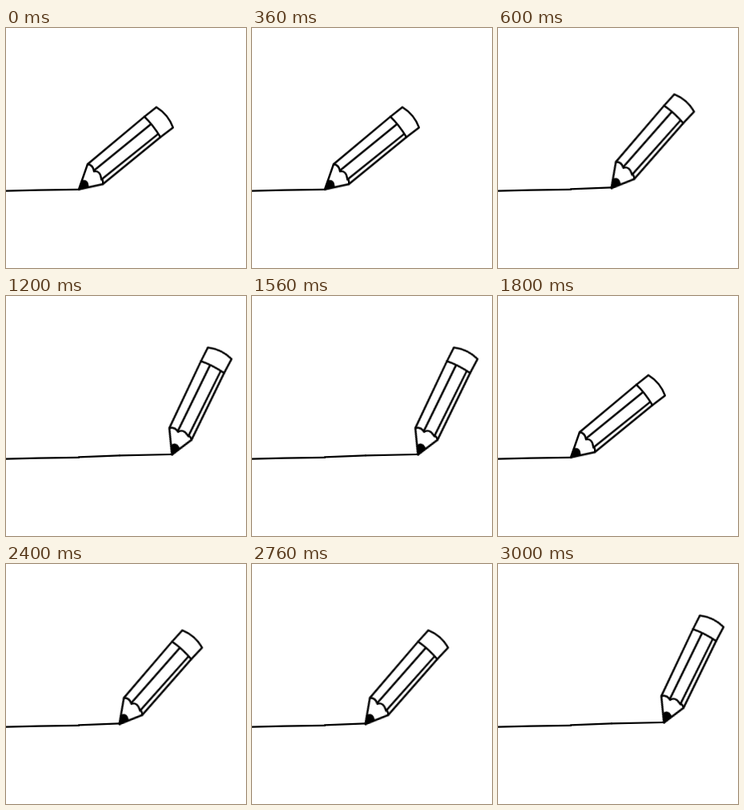
These frames come from a looping animation (300 px wide and 300 px high, 3.4 s). An HTML page without scripts:

```html
<!DOCTYPE html>
<html lang="en">
<head>
<meta charset="utf-8">
<title>Pencil drawing a line</title>
<style>
  html, body { margin: 0; width: 100%; height: 100%; overflow: hidden; background: #fff; }
  svg { display: block; width: 100%; height: 100%; }
  path { fill: none; stroke: #000; stroke-width: 2.2; stroke-linecap: round; stroke-linejoin: round; }
  .pencil path { stroke-width: 2.4; }
  .pencil .lead { fill: #000; stroke-width: 1.4; }
  .pencil, .middle, .end { animation: 3400ms step-end infinite; }
  .pencil { animation-name: pose; }
  .middle { animation-name: show-middle; }
  .end { animation-name: show-end; }

  /* Three held poses, 600 ms each, run twice with a shorter last hold */
  @keyframes pose {
    0%, 52.941% { transform: translate(91px, 202.2px); }
    17.647%, 70.588% { transform: translate(141.8px, 200.7px) rotate(-9.5deg); }
    35.294%, 88.235% { transform: translate(207.6px, 198.8px) rotate(-24.8deg); }
  }
  @keyframes show-middle {
    0%, 52.941% { opacity: 0; }
    17.647%, 70.588% { opacity: 1; }
  }
  @keyframes show-end {
    0%, 52.941% { opacity: 0; }
    35.294%, 88.235% { opacity: 1; }
  }
</style>
</head>
<body>
<svg viewBox="0 0 300 300">
  <path d="M-2 203.6L40 202.6L91 201.9"/>
  <path class="middle" d="M91 201.4L142 199.3"/>
  <path class="end" d="M142 199.3L207 198"/>

  <!-- The origin is the pencil's point -->
  <g class="pencil">
    <path d="M11 -32L82 -91.4L97 -103.3Q112 -94 117.8 -77.8L102 -65.8L30 -7L0 -.5Z"/>
    <path d="M82 -91.4Q93 -81 102 -65.8"/>
    <path d="M19.5 -24.5L89.5 -81.5M28.2 -12.7L99 -69.6"/>
    <path d="M11 -32Q18 -31 19 -23Q27 -24 28 -14Q31 -12 30 -7"/>
    <path class="lead" d="M0 0L3.5 -11Q9 -13 11 -8.5L12 -3.5Z"/>
  </g>
</svg>
</body>
</html>
```
